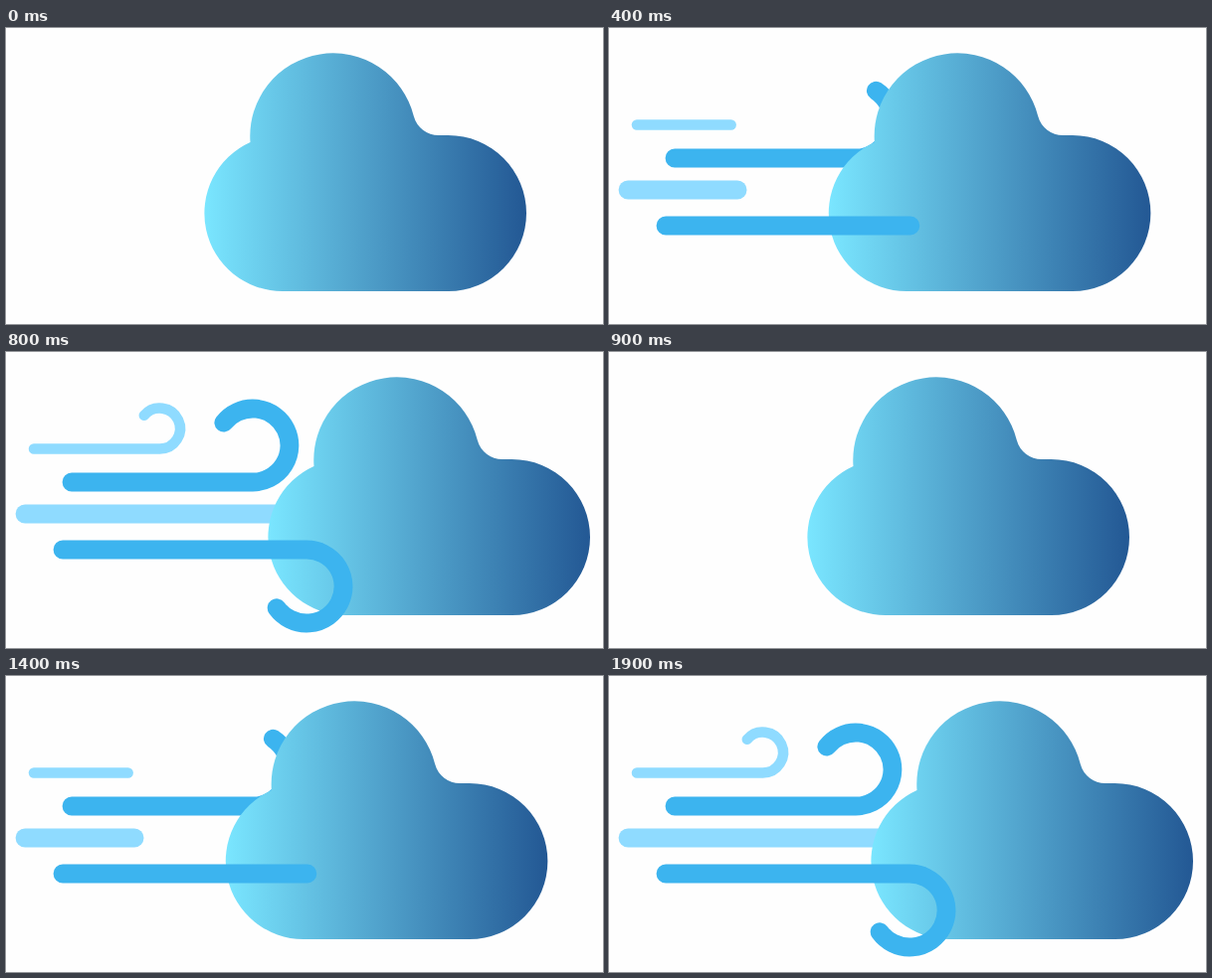
Animation of 600 by 298 pixels, one loop 2 s. Source, as an HTML page:

```html
<!DOCTYPE html>
<html lang="en">
<head>
<meta charset="utf-8">
<title>Windy cloud</title>
<style>
  html, body { margin: 0; width: 100%; height: 100%; overflow: hidden; background: #fefefe; }
  svg { display: block; width: 100%; height: 100%; }
  .wind { fill: none; stroke-width: 18.8; stroke-linecap: round; }
  .dark { stroke: #3cb4ef; }
  .light { stroke: #8fdbff; }
  .thin { stroke-width: 10.5; }
</style>
</head>
<body>
<svg viewBox="0 0 600 298">
  <defs>
    <linearGradient id="sky">
      <stop offset="0" stop-color="#7ae6ff"/>
      <stop offset="1" stop-color="#235894"/>
    </linearGradient>
  </defs>
  <path id="breeze" class="wind light thin" d="M28 97.5H154.5A20.5 20.5 0 1 0 138.8 63.8"/>
  <path id="upper" class="wind dark" d="M66 131H248A37 37 0 1 0 218.8 71.2"/>
  <path id="straight" class="wind light" d="M19 163H307"/>
  <path id="cloud" fill="url(#sky)" d="M245.5 115A78.5 78.5 0 0 0 277.5 265H444.5A78.5 78.5 0 0 0 444.5 108H435A26 26 0 0 1 409.8 88.7A83.5 83.5 0 0 0 245.5 115Z"/>
  <path id="lower" class="wind dark" d="M57 199H302A37 37 0 1 1 272.1 257.7"/>
</svg>
<script>
  const LOOP = 2000, GUST = 1000, RESET = 900, STEP = 100;
  const byId = id => document.getElementById(id);
  const clamp = x => Math.min(1, Math.max(0, x));
  const easeInOut = p => p < 0.5 ? 2 * p * p : 1 - 2 * (1 - p) ** 2;

  // Each line is drawn along points of [time in ms, drawn share].
  const winds = [
    ['upper', [[0, 0], [100, 0.237], [484, 1]]],
    ['lower', [[99, 0], [584, 1]]],
    ['breeze', [[181, 0], [664, 1]]],
    ['straight', [[215, 0], [699, 1]]],
  ].map(([id, keys]) => ({ el: byId(id), length: byId(id).getTotalLength(), keys }));

  function valueAt(keys, t) {
    let value = keys[0][1];
    for (let i = 1; i < keys.length; i++) {
      const [t0, v0] = keys[i - 1], [t1, v1] = keys[i];
      if (t > t0) value = v0 + (v1 - v0) * clamp((t - t0) / (t1 - t0));
    }
    return value;
  }

  // The first gust clears early; the second holds until the loop ends.
  function gustTime(t) {
    if (t >= GUST) return t - GUST;
    return t < RESET ? t : 0;
  }

  function draw(elapsed) {
    // Ten poses a second, with a little slack for frame timing.
    const stepped = Math.floor((elapsed + 8) / STEP) * STEP;
    const t = gustTime(stepped % LOOP);
    for (const { el, length, keys } of winds) {
      const drawn = length * valueAt(keys, t);
      el.style.visibility = drawn > 0 ? 'visible' : 'hidden';
      el.setAttribute('stroke-dasharray', `${drawn} 1000`);
    }
    const shift = 64 * easeInOut(clamp((t - 212) / 460));
    byId('cloud').setAttribute('transform', `translate(${shift})`);
  }

  const start = performance.now();
  function tick() {
    draw(performance.now() - start);
    requestAnimationFrame(tick);
  }
  tick();
</script>
</body>
</html>
```
